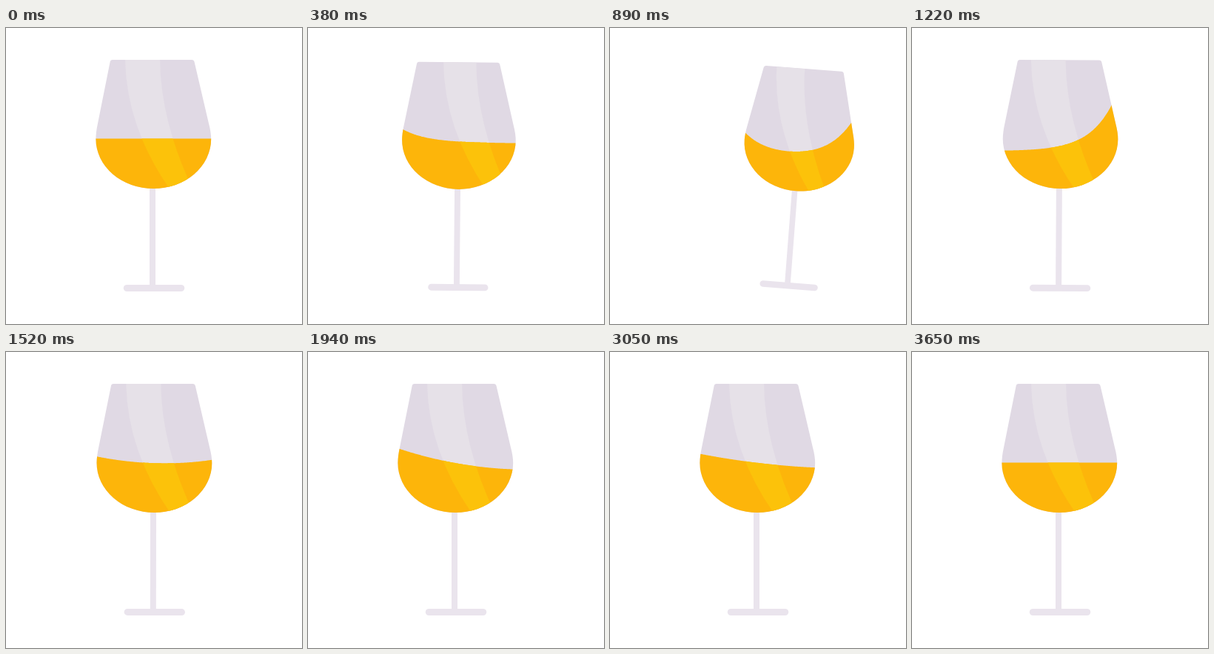
Recreate the animation shown at these times as an HTML page with a canvas. Size 400 px wide and 400 px high, loop 3.68 s.

```html
<!DOCTYPE html>
<html lang="en">
<head>
<meta charset="utf-8">
<title>Swirling glass</title>
<style>
  html, body { margin: 0; width: 100%; height: 100%; overflow: hidden; background: #fff; }
  canvas { display: block; width: 400px; height: 400px; }
</style>
</head>
<body>
<canvas id="stage" width="400" height="400"></canvas>
<script>
const ctx = document.getElementById('stage').getContext('2d');
const LOOP = 3680, START = 230, END = 3650, STEP = 30;
const LEVEL = 149.5;
const PIVOT = { x: 200, y: 351.5 };
const BOWL = { x: 199.3, y: 150, rx: 77.9, ry: 67 };
const COLORS = {
  stem: '#eae4ed', glass: '#e0d9e4', glassShine: '#e6e1e8',
  wine: '#fdb50a', wineShine: '#fcc20a'
};

// Eased 0..1 ramp with soft ends.
function ramp(from, to, t) {
  const u = Math.min(1, Math.max(0, (t - from) / (to - from)));
  return u * u * u * (10 - 15 * u + 6 * u * u);
}

// Eases from pose to pose; each pose is [time, value].
function poses(...keys) {
  return t => keys.slice(1).reduce(
    (value, [time, next], i) => value + (next - keys[i][1]) * ramp(keys[i][0], time, t),
    keys[0][1]);
}

const bump = (t, peak, width) => Math.exp(-(((t - peak) / width) ** 2));

// Sideways swing: wind up, left, right, overshoot, settle.
const swing = poses([START, 0], [345, 5], [560, -60], [1015, 57],
  [1275, -4], [1520, 0.8], [1700, 0]);
const tilt = t => 0.117 * swing(t - 12) * Math.PI / 180;
const depth = t => 0.047 * (ramp(START, 620, t) - ramp(900, 1275, t));
const shineShift = poses([START, 0], [645, 64], [890, -2], [1040, -12], [1300, 0]);

// Height of the wine surface at u, from -1 (left wall) to 1 (right wall).
function surfaceAt(t) {
  // Swirling: wine climbs the left wall, then the right one.
  const left = 15.8 * bump(t, 650, 180);
  const right = 15.8 * bump(t, 1065, 180);
  const drop = Math.min(20.5, 2.28 * (left + right));
  // Settling: a rocking surface that dies away.
  const fade = ramp(1250, 1520, t) * Math.max(0, (END - t) / 1840) ** 0.65;
  const rock = 20 * fade * Math.cos(Math.PI * (t - 1800) / 600);
  const bend = 6 * fade;
  return u => LEVEL + drop - left * Math.exp(-2.4 * u) - right * Math.exp(2.4 * u)
    + rock * u + bend * (0.1 - u * u);
}

function winePath(t) {
  const surface = surfaceAt(t);
  const p = new Path2D();
  p.moveTo(115, 225);
  for (let x = 115; x <= 284; x++) p.lineTo(x, surface((x - BOWL.x) / BOWL.rx));
  p.lineTo(284, 225);
  p.closePath();
  return p;
}

function bowlPath() {
  const p = new Path2D();
  p.moveTo(144, 43);
  p.lineTo(251, 43);
  p.quadraticCurveTo(254, 43, 254.6, 46);
  p.lineTo(274, 129);
  p.quadraticCurveTo(277.2, 141, BOWL.x + BOWL.rx, BOWL.y);
  p.ellipse(BOWL.x, BOWL.y, BOWL.rx, BOWL.ry, 0, 0, Math.PI);
  p.quadraticCurveTo(121.4, 141, 124, 129);
  p.lineTo(140.6, 46);
  p.quadraticCurveTo(141, 43, 144, 43);
  p.closePath();
  return p;
}

function shinePath(t) {
  const l = shineShift(t), r = l - 150 * depth(t);
  const p = new Path2D();
  p.moveTo(161 + l, 43);
  p.quadraticCurveTo(163 + l, 137, 225 + l, 223);
  p.lineTo(256 + r, 225);
  p.quadraticCurveTo(209 + r, 130, 208 + r, 43);
  p.closePath();
  return p;
}

const bowl = bowlPath();

function fill(path, color) {
  ctx.fillStyle = color;
  ctx.fill(path);
}

function line(x0, y0, x1, y1, width, cap) {
  ctx.lineWidth = width;
  ctx.lineCap = cap;
  ctx.beginPath();
  ctx.moveTo(x0, y0);
  ctx.lineTo(x1, y1);
  ctx.stroke();
}

function draw(t) {
  const far = depth(t);
  ctx.fillStyle = '#fff';
  ctx.fillRect(0, 0, 400, 400);
  ctx.save();
  ctx.translate(PIVOT.x + swing(t), PIVOT.y - 70 * far);
  ctx.rotate(tilt(t));
  ctx.scale(1 - far, 1 - far);
  ctx.translate(-PIVOT.x, -PIVOT.y);

  ctx.strokeStyle = COLORS.stem;
  line(198, 212, 198, 351, 8, 'butt');
  line(163.3, 351.5, 236.7, 351.5, 9, 'round');

  const shine = shinePath(t), wine = winePath(t);
  fill(bowl, COLORS.glass);
  ctx.clip(bowl);
  fill(shine, COLORS.glassShine);
  fill(wine, COLORS.wine);
  ctx.clip(wine);
  fill(shine, COLORS.wineShine);
  ctx.restore();
}

const begin = performance.now();
function tick() {
  const t = (performance.now() - begin) % LOOP;
  draw(t < START ? 0 : START + Math.floor((t - START) / STEP) * STEP);
  requestAnimationFrame(tick);
}
tick();
</script>
</body>
</html>
```
